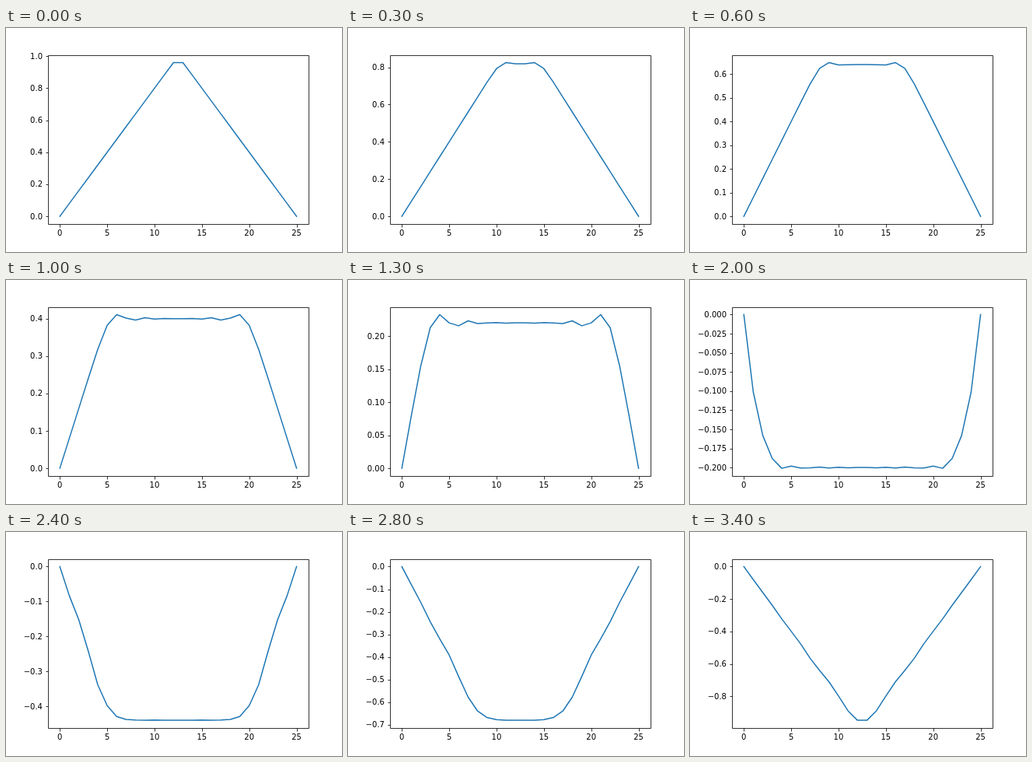
An HTML page that plays this animation: 432x288 px, repeating every 3.5 s.

```html
<!DOCTYPE html>
<html lang="en">
<head>
<meta charset="utf-8">
<title>Plucked string</title>
<style>
  html, body { margin: 0; width: 100%; height: 100%; overflow: hidden; background: #fff; }
  svg { display: block; width: 432px; height: 288px; }
  text { font: 10px "DejaVu Sans", sans-serif; fill: #000; }
  .axis { fill: none; stroke: #000; stroke-width: 0.8; }
  .wave { fill: none; stroke: #1f77b4; stroke-width: 1.5; stroke-linejoin: round; stroke-linecap: square; }
</style>
</head>
<body>
<svg viewBox="0 0 432 288">
  <g id="xTicks"></g>
  <g id="yTicks"></g>
  <polyline id="wave" class="wave"/>
  <path class="axis" d="M54.5 35.5H389.5V252.5H54.5Z"/>
</svg>
<script>
const STEP_MS = 100, STEPS = 35, LAST = 25;
const BOX = { left: 54, right: 388.8, top: 34.56, bottom: 252 };
const MARGIN = 0.05;
const COURANT = 0.75;

const byId = id => document.getElementById(id);
const snap = v => Math.round(v) + 0.5;

// Wave equation on a string with fixed ends, leapfrog scheme, released at rest.
function simulate() {
  const k = COURANT ** 2;
  const bend = (u, i) => u[i - 1] - 2 * u[i] + u[i + 1];
  const advance = fn => Array.from({ length: LAST + 1 }, (_, i) => i % LAST ? fn(i) : 0);
  const start = advance(i => 0.08 * Math.min(i, LAST - i));
  const states = [start, advance(i => start[i] + k / 2 * bend(start, i))];
  while (states.length < STEPS) {
    const [before, now] = states.slice(-2);
    states.push(advance(i => 2 * now[i] - before[i] + k * bend(now, i)));
  }
  return states;
}

function makeScale(min, max, from, to) {
  const pad = (max - min) * MARGIN;
  const lo = min - pad, hi = max + pad;
  const map = v => from + (v - lo) / (hi - lo) * (to - from);
  return { lo, hi, map };
}

function niceStep(range, bins) {
  const raw = range / bins;
  const power = 10 ** Math.floor(Math.log10(raw));
  return power * [1, 2, 2.5, 5, 10].find(s => s * power >= raw);
}

function decimalsOf(step) {
  let d = 1;
  while (Math.abs(step * 10 ** d - Math.round(step * 10 ** d)) > 1e-6) d++;
  return d;
}

function label(x, y, anchor, text) {
  return `<text x="${x}" y="${y}" text-anchor="${anchor}">${text}</text>`;
}

function xTicks() {
  let out = "";
  for (let v = 0; v <= LAST; v += 5) {
    const x = xScale.map(v);
    out += `<path class="axis" d="M${snap(x)} 252.5v4"/>` + label(x, 267, "middle", v);
  }
  return out;
}

function yTicks(scale) {
  const step = niceStep(scale.hi - scale.lo, 9);
  const digits = decimalsOf(step);
  let out = "";
  for (let k = Math.ceil(scale.lo / step); k * step <= scale.hi; k++) {
    const y = scale.map(k * step);
    const text = (k < 0 ? "\u2212" : "") + Math.abs(k * step).toFixed(digits);
    out += `<path class="axis" d="M54.5 ${snap(y)}h-3"/>` +
      label(47, Math.round(y + 3.5), "end", text);
  }
  return out;
}

const xScale = makeScale(0, LAST, BOX.left, BOX.right);
const states = simulate();
byId("xTicks").innerHTML = xTicks();

let shown = -1;
function draw(step) {
  if (step === shown) return;
  shown = step;
  const u = states[step];
  const yScale = makeScale(Math.min(...u), Math.max(...u), BOX.bottom, BOX.top);
  byId("yTicks").innerHTML = yTicks(yScale);
  byId("wave").setAttribute("points",
    u.map((v, i) => `${xScale.map(i).toFixed(2)},${yScale.map(v).toFixed(2)}`).join(" "));
}

const begin = performance.now();
function tick() {
  draw(Math.floor((performance.now() - begin) / STEP_MS) % STEPS);
  requestAnimationFrame(tick);
}
tick();
</script>
</body>
</html>
```
